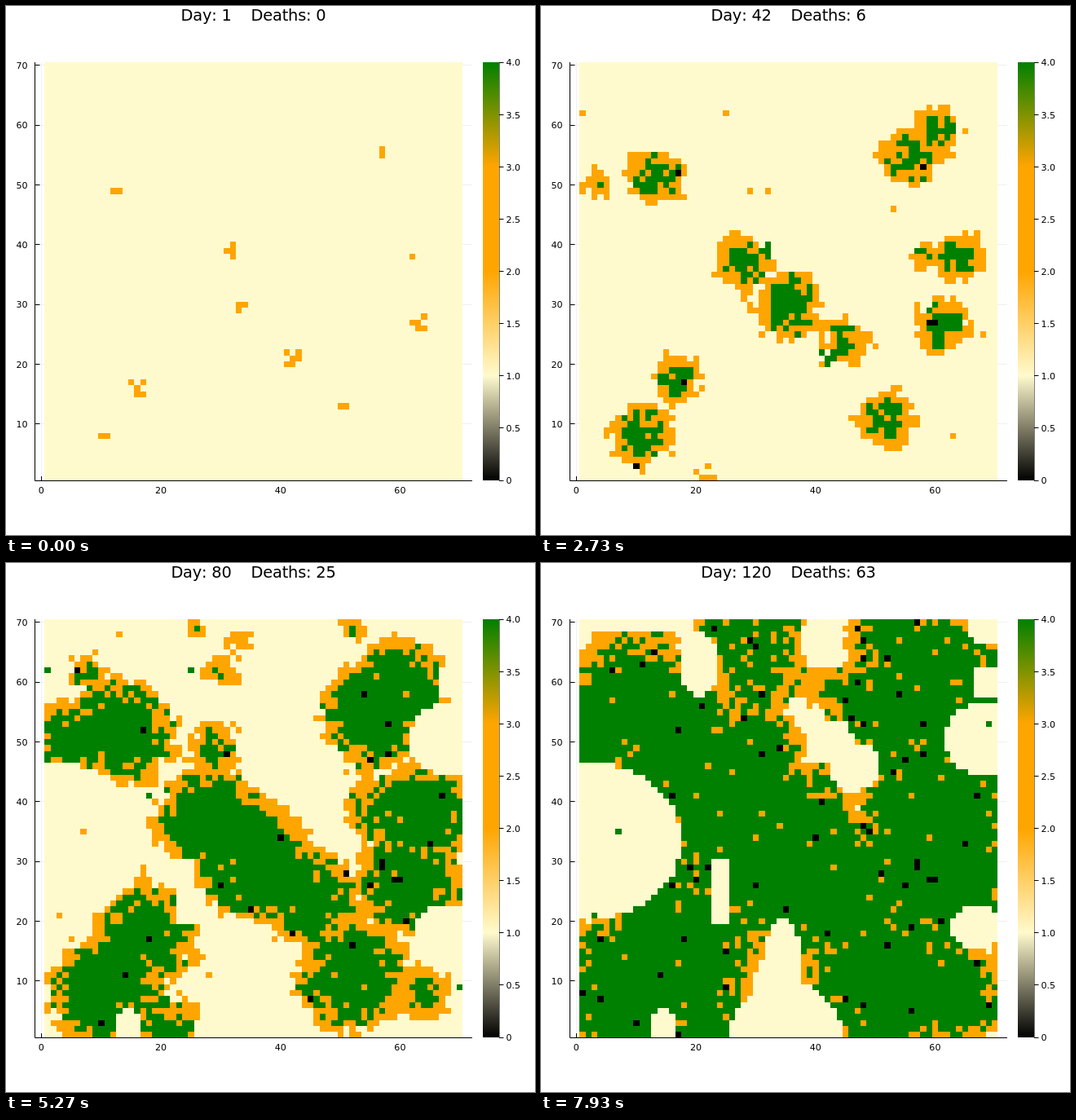
An HTML page for the animation above (8000 ms loop, 649 px wide and 649 px high).

```html
<!DOCTYPE html>
<html lang="en">
<head>
<meta charset="utf-8">
<title>Epidemic grid</title>
<style>
html, body { margin: 0; width: 100%; height: 100%; overflow: hidden; background: #fff; }
svg { display: block; width: 100vw; height: 100vh; }
text { font-family: "DejaVu Sans", sans-serif; font-size: 11.1px; font-kerning: none; fill: #000; }
#title { font-size: 19.4px; letter-spacing: -.2px; text-anchor: middle; }
#cells { shape-rendering: crispEdges; }
</style>
</head>
<body>
<svg viewBox="0 0 649 649">
  <defs>
    <linearGradient id="scale" x1="0" y1="1" x2="0" y2="0">
      <stop offset="0" stop-color="#000"/>
      <stop offset=".25" stop-color="#fffacd"/>
      <stop offset=".5" stop-color="#ffa500"/>
      <stop offset=".75" stop-color="#ffa500"/>
      <stop offset="1" stop-color="#008000"/>
    </linearGradient>
  </defs>
  <rect width="649" height="649" fill="#fff"/>
  <g id="grid" stroke="#f0f0f0"></g>
  <g id="axes" stroke="#000" fill="none"></g>
  <g id="cells">
    <rect x="47" y="69" width="513" height="513" fill="#fffacd"/>
    <path id="sick" fill="#ffa500"/>
    <path id="well" fill="#008000"/>
    <path id="dead" fill="#000"/>
  </g>
  <rect x="585" y="69" width="20" height="513" fill="url(#scale)"/>
  <g id="labels"></g>
  <text id="title" x="303.5" y="18"></text>
</svg>
<script>
const N = 70, SIZE = 513, LEFT = 47, TOP = 69, LOOP = 8000;
const SPEED = .12; // cells per day
const $ = id => document.getElementById(id);
const edgeX = x => Math.ceil(LEFT + SIZE * (x - 1) / N);
const edgeY = y => Math.ceil(TOP + SIZE * (N - y) / N);

// Centres of the clusters on the first day: x, y
const ORIGINS = [
  [13,49],[57,56],[31,39],[62,38],[34,30],[63,27],[42,21],[16,16],[50,13],[10,8]
];

// Spreading outbreaks: x, y, start day
const OUTBREAKS = [
  [13,51.5,0],[60,59,6],[55.5,54.5,2],[28,37,2],[64,38,5],[58,38.5,24],[35.5,30,-6],
  [61,26.5,3],[45,24,9],[17,17.5,6],[52,11,0],[11,8,-4],[3.5,50.5,26],[21,2,32],
  [29,49,44],[52,69,60],[30,62,58],[33,67,66],[26,69,68],[64,8,42],[69,25,62],
  [8,61,52],[22,48,62],[43,59,84],[17,27,70],[5,17,76],[25,14,66],[41,43,88],
  [68,65,84],[14,66,95],[38,62,90]
];

// Ellipses that stay healthy: x, y, radii
const SAFE = [
  [2,33.5,15.5,13],[35,0,9.5,10],[34.5,13,3,7.5],[42.5,50,4,4],[46.5,46,4.5,4],
  [68,50.5,6.5,6],[69,60,3,3],[67,19,4.5,4],[69,69,3.5,2.5],[41,67,3.5,5],
  [20.5,63,3.5,5.5],[10,71,10.5,3],[14.5,1,2,5],[24,25,2,6]
];

// Day, deaths
const TOLL = [[1,0],[25,1],[42,6],[58,10],[80,25],[109,49],[120,63]];

function rnd(x, y, k) {
  let h = Math.imul(x, 374761393) ^ Math.imul(y, 668265263) ^ Math.imul(k, 1274126177);
  h = Math.imul(h ^ (h >>> 15), 2246822519);
  h = Math.imul(h ^ (h >>> 13), 3266489917);
  return ((h ^ (h >>> 16)) >>> 0) / 4294967296;
}

function infectionDay(x, y) {
  const first = ORIGINS.some(([ox, oy]) => {
    const gap = Math.max(Math.abs(x - ox), Math.abs(y - oy));
    return gap === 0 || gap === 1 && rnd(x, y, 5) < .25;
  });
  if (first) return 1;
  const stray = rnd(x, y, 6) < .004 ? 20 + rnd(x, y, 7) * 80 : Infinity;
  if (SAFE.some(([sx, sy, rx, ry]) => Math.hypot((x - sx) / rx, (y - sy) / ry) < 1)) return stray;
  const front = Math.min(...OUTBREAKS.map(([ox, oy, start]) => start + Math.hypot(x - ox, y - oy) / SPEED));
  const noise = (rnd(x, y, 1) - .5) * 13 + (rnd(x >> 1, y >> 1, 8) - .5) * 13;
  return Math.min(stray, Math.max(2, front + noise));
}

function toll(day) {
  const i = Math.max(1, TOLL.findIndex(p => p[0] >= day));
  const [[d0, n0], [d1, n1]] = [TOLL[i - 1], TOLL[i]];
  return Math.floor(n0 + (n1 - n0) * (day - d0) / (d1 - d0) + 1e-6);
}

const cells = [];
for (let y = 1; y <= N; y++)
  for (let x = 1; x <= N; x++) {
    const from = infectionDay(x, y);
    const cured = from + 9 - 12 * Math.log(1 - rnd(x, y, 2));
    const again = rnd(x, y, 3) < .12 ? 80 + rnd(x, y, 4) * 60 : Infinity;
    cells.push({ from, cured, again, death: Infinity });
  }

// Each death strikes a random cell that is ill at the time
for (let day = 2, count = 0, tries = 0; day <= 120; day++)
  while (count < toll(day)) {
    const c = cells[Math.floor(rnd(++tries, day, 9) * cells.length)];
    if (day < c.from + 4 || day > c.cured || c.death < day) continue;
    c.death = day;
    count++;
  }

function state(c, day) {
  if (day >= c.death) return 'dead';
  if (day < c.from) return '';
  if (day < c.cured) return 'sick';
  return c.again > c.cured && day >= c.again && day < c.again + 12 ? 'sick' : 'well';
}

let shown = 0;
function draw(ms) {
  const day = 1 + Math.floor((Math.floor(ms / 10) + .5) * .15);
  if (day === shown) return;
  shown = day;
  const d = { sick: '', well: '', dead: '' };
  for (let y = 1; y <= N; y++) {
    let run = '', first = 1;
    for (let x = 1; x <= N + 1; x++) {
      const s = x > N ? '' : state(cells[(y - 1) * N + x - 1], day);
      if (s === run) continue;
      if (run) d[run] += `M${edgeX(first)} ${edgeY(y)}H${edgeX(x)}V${edgeY(y - 1)}H${edgeX(first)}z`;
      run = s;
      first = x;
    }
  }
  for (const id in d) $(id).setAttribute('d', d[id]);
  $('title').textContent = `Day: ${day}${'\u00a0'.repeat(4)}Deaths: ${toll(day)}`;
}

function add(parent, tag, attrs, text = '') {
  const el = document.createElementNS($('title').namespaceURI, tag);
  for (const k in attrs) el.setAttribute(k, attrs[k]);
  el.textContent = text;
  $(parent).append(el);
}
const line = (parent, d) => add(parent, 'path', { d });
const label = (x, y, anchor, text) => add('labels', 'text', { x, y, 'text-anchor': anchor }, text);

line('axes', 'M35.5 69V582.5H572M605 69V582');
for (let v = 0; v <= 60; v += 20) {
  const x = 43.3 + v * 7.335, px = Math.floor(x) + .5;
  line('grid', `M${px} 69V582`);
  line('axes', `M${px} 577V582`);
  label(x, 598, 'middle', v);
}
for (let v = 10; v <= 70; v += 10) {
  const y = 586.1 - v * 7.335, py = Math.floor(y) + .5;
  line('grid', `M36 ${py}H572`);
  line('axes', `M35 ${py}H41.5`);
  label(26.5, y + 4.2, 'end', v);
}
for (let i = 0; i <= 8; i++) {
  const y = 582 - i * 64.1;
  line('axes', `M605 ${Math.floor(y) + .5}H610.5`);
  label(613.5, y + 4.2, 'start', i ? (i / 2).toFixed(1) : '0');
}

const begin = performance.now();
function tick() {
  draw((performance.now() - begin) % LOOP);
  requestAnimationFrame(tick);
}
tick();
</script>
</body>
</html>
```
